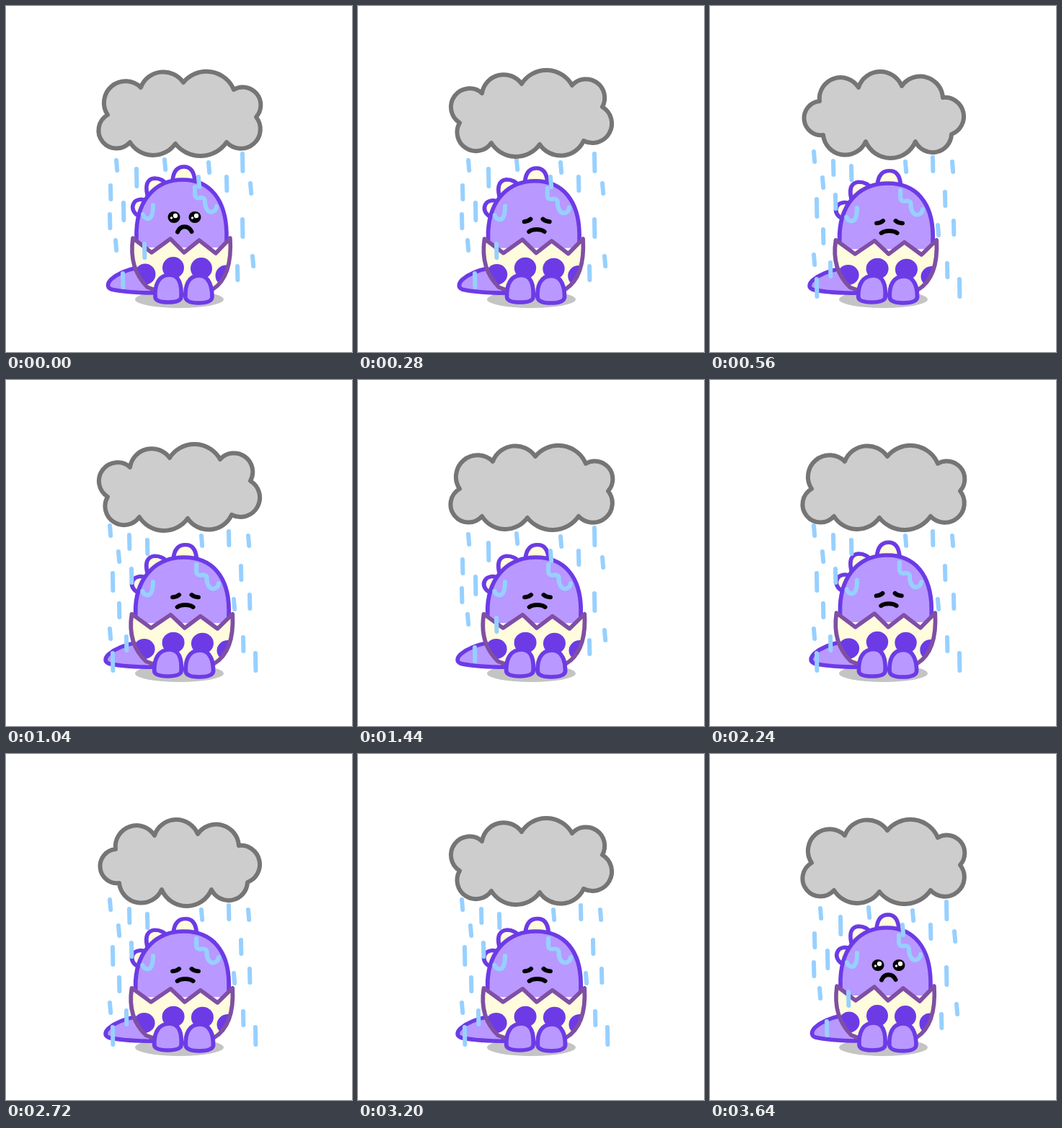
These frames come from a looping animation (480 px wide and 480 px high, 3.68 s). An HTML page:

```html
<!DOCTYPE html>
<html lang="en">
<head>
<meta charset="utf-8">
<title>Rainy day</title>
<style>
  html, body { margin: 0; width: 100%; height: 100%; overflow: hidden; background: #fff; }
  svg { display: block; width: 100%; height: 100%; stroke-linecap: round; stroke-linejoin: round; }
  .skin { fill: #b998ff; stroke: #6c3be6; stroke-width: 5.6; }
  .cream { fill: #fffbdd; }
  .drip, #rain { fill: none; stroke: #97d0ff; stroke-width: 6; }
  .line { fill: none; stroke: #000; stroke-width: 6; }
</style>
</head>
<body>
<svg viewBox="0 0 480 480">
  <defs>
    <path id="shell" d="M176 322L202 342L228 323L247 342L268 325L291 343L311 322C313 355 307 380 287 393Q243 410 196 390C178 372 172 350 176 322Z"/>
    <clipPath id="inside"><use href="#shell"/></clipPath>
    <g id="eye">
      <ellipse rx="8.5" ry="8"/>
      <circle cx="2" cy="-2" r="3.2" fill="#fff"/>
      <circle cx="-3.5" cy="1" r="1.7" fill="#fff"/>
    </g>
  </defs>
  <ellipse cx="240.5" cy="407" rx="61.5" ry="12" fill="#c4c4c4"/>
  <g id="body">
    <path class="skin" d="M206 398C180 398 160 396 146 393C139 390 141 384 146 379C155 371 168 366 182 363Z"/>
    <g class="skin">
      <path class="cream" d="M231 243C232 229 238 223 247 223C256 223 261 229 262 243"/>
      <path class="cream" d="M196 262C193 248 196 240 206 239C214 239 220 243 222 247"/>
      <path class="cream" d="M187 293C176 288 174 280 177 274C180 268 188 267 194 270"/>
    </g>
    <path class="skin" d="M181 335V312C183 266 210 241 245 241C284 241 305 270 306 315V335"/>
    <path class="drip" d="M204 276Q204 296 196 295Q191 294 190 289"/>
    <path class="drip" d="M262 251V261Q262 268 270 266Q277 265 276 274Q278 286 285 286Q292 284 292 278"/>
    <g id="awake">
      <use href="#eye" x="233" y="293"/>
      <use href="#eye" x="262" y="293"/>
      <path class="line" d="M238 313.5C242 304 253 304 257.5 313"/>
    </g>
    <path id="asleep" class="line" d="M230.5 298Q236 297.5 239 294.5M256 294.5Q259 297.5 265 298M237 312C242 308 253 308 258 312"/>
    <use href="#shell" class="cream"/>
    <g clip-path="url(#inside)" fill="#6c3be6">
      <circle cx="193" cy="372" r="14.5"/>
      <circle cx="232" cy="363" r="15"/>
      <circle cx="271" cy="364" r="15"/>
      <circle cx="305" cy="374" r="14.5"/>
    </g>
    <use href="#shell" fill="none" stroke="#7f4fa3" stroke-width="5.6"/>
    <path class="skin" d="M207 404C206 385 213 373 227 373C240 373 244 386 243 404Q242 411 225 411Q208 411 207 404Z"/>
    <path class="skin" d="M249 404C248 388 253 374 268 374C282 374 286 390 286 404Q285 412 267 412Q250 412 249 404Z"/>
  </g>
  <path id="rain"/>
  <path id="cloud" fill="#cdcdcd" stroke="#757575" stroke-width="6"/>
</svg>
<script>
const LOOP = 3680, TICK = 40;
const $ = id => document.getElementById(id);

// Each notch: x, y and the height of the bump that follows it clockwise.
const cloudA = [[141,151,27], [187,113,18], [246,106,20], [316,116,21], [347,154,26], [306,189,18], [235,191,17], [172,189,29]];
const cloudB = [[152,132,23], [206,113,21], [266,111,21], [323,127,23], [335,178,20], [285,188,23], [216,188,23], [157,179,24]];
const cloudC = [[141,162,28], [172,121,19], [227,108,20], [297,110,23], [339,140,26], [313,187,18], [252,192,18], [185,190,25]];
const clouds = [cloudA, cloudB, cloudC].map(cloudPath);

// Tops of the short, middle and long drops.
const rainA = [
  [[153,214], [220,213], [152,325], [267,237], [281,217], [339,246], [342,347]],
  [[145,249], [144,289], [192,330], [162,371], [306,237], [321,361]],
  [[181,226], [163,273], [328,205], [328,296]]
];
const rainB = [
  [[144,202], [156,238], [144,345], [271,216], [336,216], [316,304]],
  [[171,215], [196,222], [174,262], [157,310], [167,356], [309,210], [326,258], [338,298], [329,357]],
  [[148,268], [148,379], [346,379]]
];
const rainC = rainA.map(drops => drops.map(([x, y]) => [240 + (240 - x) * 1.18, y + 10]));
const rains = [rainA, rainB, rainC].map(rainPath);

// Time and height of the body, 0 slumped, 1 upright.
const lift = [[0,1], [240,1], [340,0], [1500,0], [1960,1], [2600,0], [3160,0], [3400,.12], [3640,1], [LOOP,1]];

function cloudPath(notches) {
  const arcs = notches.map(([x, y, bump], i) => {
    const [nx, ny] = notches[(i + 1) % notches.length];
    const half = Math.hypot(nx - x, ny - y) / 2;
    const r = (half * half + bump * bump) / (2 * bump);
    return `A${r} ${r} 0 ${bump > half ? 1 : 0} 1 ${nx} ${ny}`;
  });
  return `M${notches[0][0]} ${notches[0][1]}${arcs.join('')}Z`;
}

function rainPath(sizes) {
  return sizes.flatMap((drops, size) =>
    drops.map(([x, y]) => `M${x} ${y}l${size ? .4 : 1.2} ${14 + 5 * size}`)).join('');
}

function ease(keys, t) {
  const i = keys.findIndex(key => key[0] > t);
  const [t0, v0] = keys[i - 1], [t1, v1] = keys[i];
  const p = (t - t0) / (t1 - t0);
  return v0 + (v1 - v0) * p * p * (3 - 2 * p);
}

function draw(now) {
  const t = Math.floor(now % LOOP / TICK) * TICK;
  const slump = 1 - ease(lift, t);
  const awake = t < 280 || t >= 3400;
  $('cloud').setAttribute('d', clouds[Math.floor(t / 120) % 3]);
  $('rain').setAttribute('d', rains[Math.floor(t / 80) % 3]);
  $('body').setAttribute('transform',
    `translate(243 410) matrix(${1 + .035 * slump} 0 ${-.01 * slump} ${1 - .03 * slump} 0 0) translate(-243 -410)`);
  $('awake').style.display = awake ? '' : 'none';
  $('asleep').style.display = awake ? 'none' : '';
}

const start = performance.now();
function frame() {
  draw(performance.now() - start);
  requestAnimationFrame(frame);
}
frame();
</script>
</body>
</html>
```
